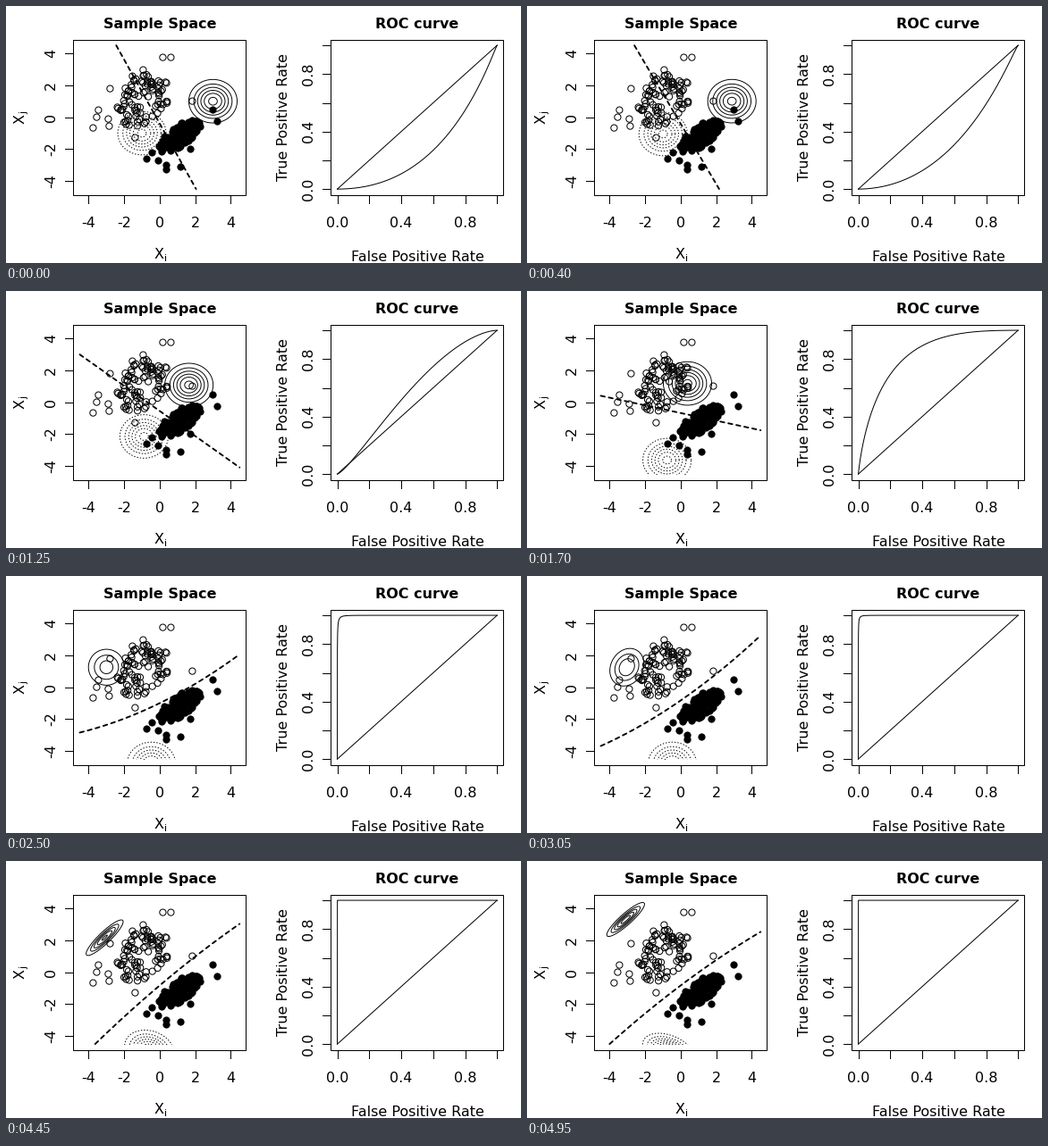
Write a matplotlib script that moves like this. It is 576x288 px and loops after 5000 ms.

```python
import math

import numpy as np
import matplotlib.pyplot as plt
from matplotlib.animation import FuncAnimation
from matplotlib.collections import LineCollection
from matplotlib.patches import Rectangle

W, H, DPI = 576, 288, 72
FRAMES, INTERVAL = 100, 50
LIM = 4.5
TOP, BOTTOM = 38, 212
LEFT_BOX, RIGHT_BOX = (76, 269), (364, 557)

plt.rcParams.update({"font.family": "DejaVu Sans", "font.size": 16})

normal_cdf = np.vectorize(lambda z: .5 * (1 + math.erf(z / math.sqrt(2))))


def smooth(frame, start, end):
    p = min(max((frame - start) / (end - start), 0), 1)
    return p * p * (3 - 2 * p)


def power(frame, start, end, p):
    return min(max((frame - start) / (end - start), 0), 1) ** p


def to_px(x, y):
    return 172.5 + 19.86 * x, 125 - 17.9 * y


def roc_px(x, y):
    return 371.15 + 178.7 * x, 205.56 - 161.1 * y


def solid_state(f):
    """Mean x/y, variance x/y and correlation of the solid Gaussian."""
    x = 3 - 6 * power(f, 0, 50, 2.15) - .1 * smooth(f, 50, 79)
    y = 1 + .25 * power(f, 0, 39, 2.7) + 2.05 * power(f, 66, 99, 2.25)
    vx = .5 - .17 * smooth(f, 36, 62)
    vy = .5 - .17 * smooth(f, 70, 99)
    return x, y, vx, vy, .9 * smooth(f, 50, 88)


def dotted_state(f):
    """The same values for the dotted Gaussian, which flattens at the end."""
    end = smooth(f, 79, 99)
    x = -1 + .53 * power(f, 0, 50, 2.15) - .2 * end
    y = -1 - 3.8 * power(f, 0, 39, 2.7) - .17 * end
    return x, y, .5, .5 - .2 * end, -.38 * end


def boundary_y(f, x):
    """Bisector of the two means, later turned further and bent."""
    ax_, ay = solid_state(f)[:2]
    bx, by = dotted_state(f)[:2]
    angle = math.atan2(bx - ax_, ay - by) + math.radians(23.5) * smooth(f, 36, 79)
    offset = -.4 - .6 * power(f, 0, 50, 2) + .17 * smooth(f, 50, 61)
    bend = .03 * smooth(f, 38, 50) - .05 * smooth(f, 62, 92)
    return offset + math.tan(angle) * x + bend * x ** 2


def roc_shift(f):
    """Separation of the two classes in a binormal ROC model."""
    return (-.93 + 5.7 * power(f, 0, 50, 2.15)
            + .3 * smooth(f, 50, 55) + 3 * smooth(f, 66, 99))


def rings(mx, my, vx, vy, rho):
    """Density contours at round levels, as pixel paths."""
    peak = 1 / (2 * np.pi * np.sqrt(vx * vy * (1 - rho ** 2)))
    outside = max(0, abs(my) - LIM)
    seen = peak * np.exp(-outside ** 2 / (2 * vy))
    step = .05 if seen <= .35 else .1 if seen <= .7 else .2
    a = np.linspace(0, 2 * np.pi, 121)
    ex = np.sqrt(vx) * np.cos(a)
    ey = np.sqrt(vy) * (rho * np.cos(a) + np.sqrt(1 - rho ** 2) * np.sin(a))
    radii = np.sqrt(2 * np.log(peak / np.arange(step, seen, step)))
    return [np.column_stack(to_px(mx + r * ex, my + r * ey)) for r in radii]


# The axes count pixels from the top left corner, aligned to pixel centres.
fig = plt.figure(figsize=(W / DPI, H / DPI), dpi=DPI, facecolor="white")
ax = fig.add_axes([0, 0, 1, 1])
ax.set_xlim(.6, W + .6)
ax.set_ylim(H + .4, .4)
ax.axis("off")


def line(xs, ys, **style):
    return ax.plot(xs, ys, **{"color": "black", "lw": 1, **style})[0]


def label(x, y, s, upright=False, ha="center", **style):
    ax.text(x, y, s, ha=ha, va="baseline", rotation=90 if upright else 0,
            rotation_mode="anchor", **style)


def panel(box, title, scale, ticks):
    x0, x1 = box
    line([x0, x1, x1, x0, x0], [TOP, TOP, BOTTOM, BOTTOM, TOP],
         solid_joinstyle="miter")
    label((x0 + x1) / 2, 25, title, weight="bold")
    for value, text in ticks:
        x, y = scale(value, value)
        line([x, x], [BOTTOM, BOTTOM + 9])
        line([x0 - 9, x0], [y, y])
        label(x, 248, text)
        label(x0 - 20.5, y, text, upright=True)


panel(LEFT_BOX, "Sample Space", to_px, [(v, f"{v}") for v in range(-4, 5, 2)])
panel(RIGHT_BOX, "ROC curve", roc_px,
      [(k / 5, "" if k % 2 else f"{k / 5:.1f}") for k in range(6)])

label(166, 283, "X", ha="left")
label(177.3, 286, "i", ha="left", size=11)
label(21, 132.5, "X", upright=True, ha="left")
label(24, 121.3, "j", upright=True, ha="left", size=11)
label(461, 286, "False Positive Rate")
label(316, 125, "True Positive Rate", upright=True)

# Each class is a few stray points around a random cloud.
rng = np.random.default_rng(4)


def cloud(n, cx, cy, wide, tilt, tall):
    r, a = np.sqrt(rng.random(n)), rng.random(n) * 2 * np.pi
    u, v = r * np.cos(a), r * np.sin(a)
    return np.column_stack([cx + wide * u, cy - tilt * u + tall * v])


def scatter(strays, points, fill):
    ax.scatter(*np.vstack([strays, points]).T, s=7.2 ** 2, facecolors=fill,
               edgecolors="black", linewidths=1)


scatter([(176, 58), (185, 58), (154, 72), (142, 79), (209, 107), (104, 117),
         (102, 125), (98, 137), (117, 93), (115, 127), (116, 135), (145, 148)],
        cloud(88, 154, 106, 30, 10, 28), "none")
scatter([(232, 116), (237, 129), (158, 171), (196, 180), (180, 183),
         (180, 178), (171, 173), (164, 164), (218, 135), (207, 160)],
        cloud(85, 194, 146, 23, 13, 13), "black")

x0, y0 = to_px(-LIM, LIM)
x1, y1 = to_px(LIM, -LIM)
window = Rectangle((x0 - .5, y0 - .5), x1 - x0 + 1, y1 - y0 + 1,
                   transform=ax.transData)


def contour_set(style):
    lines = LineCollection([], colors="black", linewidths=.95, linestyles=style)
    ax.add_collection(lines, autolim=False)
    lines.set_clip_path(window)
    return lines


solid = contour_set("solid")
dotted = contour_set((0, (1.5, 2)))
boundary = line([], [], lw=1.9, dashes=(2.4, 2.4), dash_capstyle="round")
line(*roc_px(np.array([0, 1]), np.array([0, 1])))
curve = line([], [])

grid = np.linspace(-LIM, LIM, 2001)
score = np.linspace(-10, 4.5, 400)
false_rate = normal_cdf(score)


def draw(frame):
    solid.set_segments(rings(*solid_state(frame)))
    dotted.set_segments(rings(*dotted_state(frame)))

    y = boundary_y(frame, grid)
    inside = np.abs(y) <= LIM
    boundary.set_data(*to_px(grid[inside], y[inside]))

    true_rate = normal_cdf(roc_shift(frame) + 1.25 * score)
    curve.set_data(*roc_px(false_rate, true_rate))
    return solid, dotted, boundary, curve


anim = FuncAnimation(fig, draw, frames=FRAMES, interval=INTERVAL, repeat=True)
plt.show()
```
